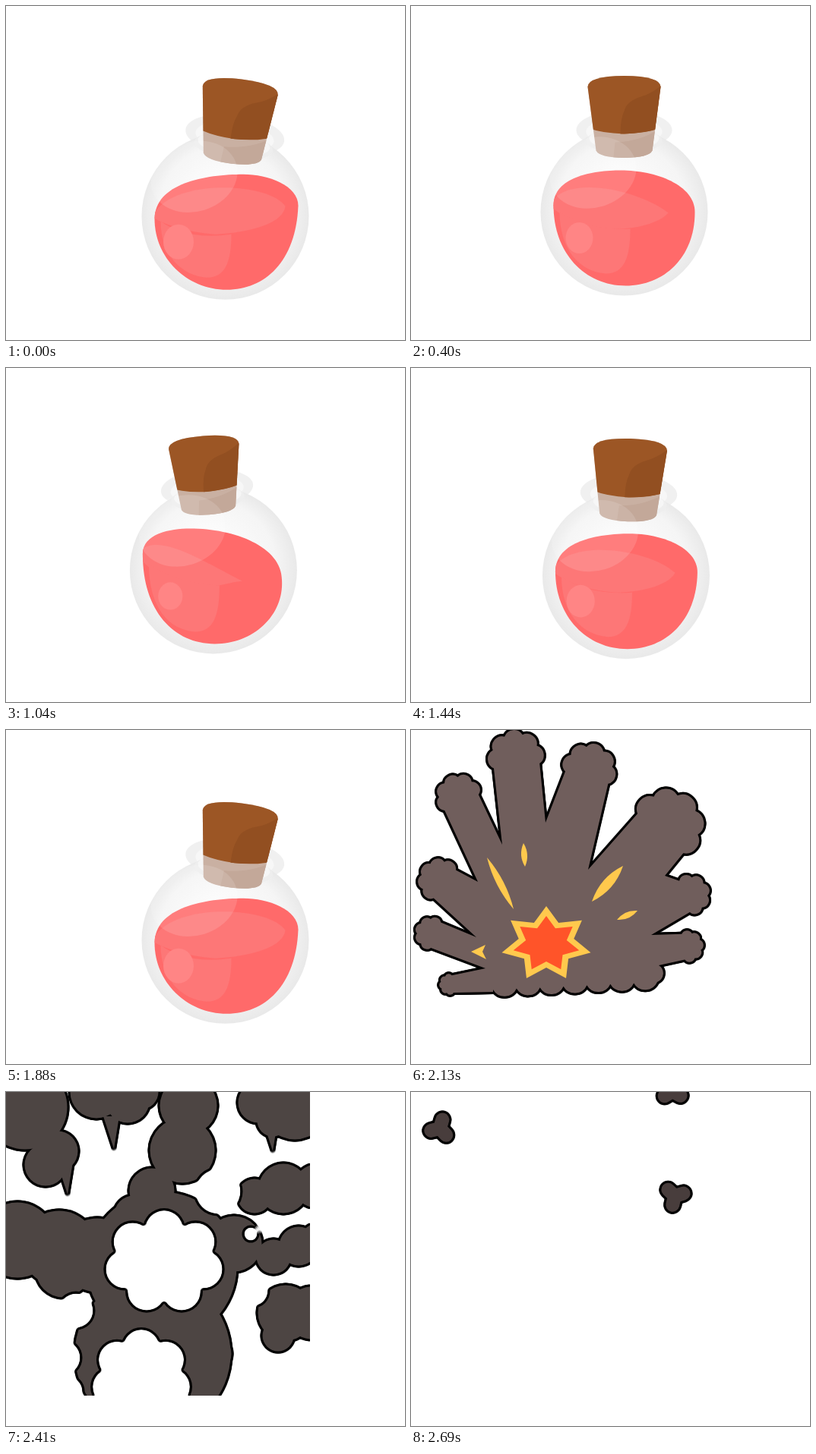
Recreate the animation shown at these times as an HTML page with a canvas. Size 525x440 px, loop 2.76 s.

```html
<!DOCTYPE html>
<html lang="en">
<head>
<meta charset="utf-8">
<title>Potion</title>
<style>
html, body { margin: 0; width: 100%; height: 100%; overflow: hidden; background: #fff; }
canvas { display: block; }
</style>
</head>
<body>
<canvas id="stage" width="525" height="440"></canvas>
<script>
const g = document.getElementById('stage').getContext('2d');
const LOOP = 2760, BLAST = 1920, AREA = 400, TAU = Math.PI * 2;

const clamp = u => Math.max(0, Math.min(1, u));
const ease = u => (1 - Math.cos(Math.PI * clamp(u))) / 2;
const mix = (a, b, u) => a + (b - a) * u;

function fill(shape, color) {
  g.fillStyle = color;
  g.fill(typeof shape === 'string' ? new Path2D(shape) : shape);
}

function oval(x, y, rx, ry, color, turn = 0) {
  g.beginPath();
  g.ellipse(x, y, rx, ry, turn, 0, TAU);
  g.fillStyle = color;
  g.fill();
}

// ---- bottle; s is the sway, from 1 (right) to -1 (left) ----

function cork() {
  g.clip(new Path2D('M-48-40Q-48-54 0-54.5Q48-54 48-40L37 44Q33 53 0 53.5Q-33 53-37 44Z'));
  fill('M-60-60H60V60H-60Z', '#c9b0a2');
  fill('M60 5Q30 32-12 33L-15 60H60Z', '#c3a899');
  fill('M-60-60H60V8Q40 21 0 22Q-40 21-60 8Z', '#9c5625');
  fill('M60-52Q40-32 22-27Q3-21 0-8Q-5 2-5 22Q40 21 60 8Z', '#924f21');
}

// The liquid tips against the bottle: one shoulder rises as the other sinks.
function liquid(s) {
  const w = 93, top = -55, peak = 28 * s - 4;
  const left = 13 * s - 9, right = -13.5 * s;
  const body = new Path2D(`M${-w} ${left}
    C${-w} ${mix(left, top, .8)} ${mix(peak, -w, .43)} ${top} ${peak} ${top}
    C${mix(peak, w, .47)} ${top} ${w + 3 * s} ${mix(right, top, .65)} ${w + 3 * s} ${right}
    C${w} 60 52 97 2 97C-52 97 ${-w} 54 ${-w} ${left}Z`);
  fill(body, '#ff6a6a');

  g.save();
  g.clip(body);
  const rim = 8 * s - 1;
  fill(`M-95 ${left - 5}C-72 -49 ${20 + 36 * s} ${-29 - 17 * s} ${58 + 21 * s} ${1 - 14 * s}
    C${45 + 30 * s} 16 10 23 -14 ${22 + 2 * s}Q-65 19 -95 ${rim - 5}Z`, '#fd7777');
  fill(`M-85 ${rim}Q-50 ${rim + 25} 8 ${22 + 2 * s}C8 60 0 81 -24 81C-58 79 -85 50 -85 ${rim}Z`, '#fd7777');
  oval(-59 - 2.5 * s, 34, 18 + 2 * s, 20.5 + 2.5 * s, '#ff8585');
  g.restore();
}

function bottle(s) {
  const r = 110;
  const hang = paint => {
    g.save();
    g.rotate((5.7 * s + 1.1 * s * s) * Math.PI / 180);
    g.translate(0, -125);
    g.scale(1 + .037 * s, 1 + .037 * s);
    paint();
    g.restore();
  };

  g.save();
  g.translate(280.5 + 8 * s, 271.5 + 5.3 * s);
  hang(() => {
    oval(0, 17, 63, 26, '#f0f0f0');
    oval(0, 19, 50, 19, '#f7f7f7');
  });
  const glass = g.createRadialGradient(-5, -25, 20, 0, 0, r);
  glass.addColorStop(0, '#fcfcfc');
  glass.addColorStop(.7, '#f5f5f5');
  glass.addColorStop(1, '#e9e9e9');
  oval(0, 0, r, r, glass);
  hang(() => {
    oval(0, 31, 50, 17, '#eeeeee');
    oval(0, 28, 46, 15, '#f6f6f6');
    cork();
  });
  liquid(s);
  oval(-41, -52, 58, 46, 'rgba(255,255,255,.13)', -.3);
  g.restore();
}

// ---- smoke: shapes are merged on a layer, then outlined ----

const layer = document.createElement('canvas');
layer.width = layer.height = AREA;
const m = layer.getContext('2d');

function ink(paint, color) {
  m.clearRect(0, 0, AREA, AREA);
  m.save();
  m.fillStyle = '#000';
  paint();
  m.restore();
  for (let a = 0; a < TAU; a += TAU / 16) g.drawImage(layer, 3 * Math.cos(a), 3 * Math.sin(a));
  m.save();
  m.globalCompositeOperation = 'source-in';
  m.fillStyle = color;
  m.fillRect(0, 0, AREA, AREA);
  m.restore();
  g.drawImage(layer, 0, 0);
}

function zoom(ctx, x, y, k) {
  ctx.translate(x, y);
  ctx.scale(k, k);
  ctx.translate(-x, -y);
}

function ball(x, y, rx, ry = rx) {
  m.beginPath();
  m.ellipse(x, y, rx, ry, 0, 0, TAU);
  m.fill();
}

// Arms clockwise: head x, y, radius, then the notch that follows.
const arms = [
  [51, 335, 12, 98, 314], [27, 268, 19, 86, 273], [38, 198, 25, 88, 200],
  [63, 88, 26, 120, 151], [138, 37, 32, 177, 122], [234, 53, 31, 233, 184],
  [337, 126, 42, 334, 192], [367, 217, 23, 316, 270], [364, 285, 18, 326, 310]
];

function plumePath() {
  let x = 108, y = 345, d = `M${x} ${y}`;
  const line = (px, py) => { d += `L${px} ${py}`; x = px; y = py; };
  const puff = (px, py) => {
    const r = Math.hypot(px - x, py - y) * .56;
    d += `A${r} ${r} 0 0 1 ${px} ${py}`;
    x = px; y = py;
  };
  for (const [hx, hy, r, nx, ny] of arms) {
    const aim = Math.atan2(hy - (y + ny) / 2, hx - (x + nx) / 2);
    for (let k = 0; k <= 5; k++) {
      const a = aim + mix(-1.9, 1.9, k / 5);
      (k ? puff : line)(hx + r * Math.cos(a), hy + r * Math.sin(a));
    }
    line(nx, ny);
  }
  for (let k = 0; k <= 7; k++) puff(mix(324, 108, k / 7), mix(332, 342, k / 7));
  return new Path2D(d + 'Z');
}

function starPath(k) {
  const star = new Path2D();
  for (let i = 0; i < 14; i++) {
    const a = i * TAU / 14 - TAU / 4, r = k * (i % 2 ? .62 : 1);
    star.lineTo(178 + 60 * r * Math.cos(a), 282 + 50 * r * Math.sin(a));
  }
  star.closePath();
  return star;
}

function spark(x1, y1, x2, y2, w) {
  const len = Math.hypot(x2 - x1, y2 - y1);
  const cx = (x1 + x2) / 2, cy = (y1 + y2) / 2;
  const dx = (y2 - y1) / len * w, dy = (x1 - x2) / len * w;
  fill(`M${x1} ${y1}Q${cx + dx} ${cy + dy} ${x2} ${y2}Q${cx - dx} ${cy - dy} ${x1} ${y1}Z`, '#ffc94d');
}

const plume = plumePath(), star = starPath(1), core = starPath(.74);

function burst(k, color, lit) {
  ink(() => {
    zoom(m, 178, 292, k);
    m.fill(plume);
  }, color);
  if (!lit) return;
  g.save();
  zoom(g, 178, 292, k);
  spark(100, 168, 135, 236, 9);
  spark(148, 149, 150, 180, 8);
  spark(279, 179, 238, 226, 13);
  spark(298, 238, 271, 250, 8);
  fill('M79 292L98 283 94 292 99 302Z', '#ffc94d');
  fill(star, '#ffc94d');
  fill(core, '#ff5429');
  g.restore();
}

// Main masses and gaps as x, y, radius.
const puffs = [
  [240, 18, 39], [232, 77, 44], [192, 130, 31], [168, 162, 27],
  [15, 195, 51], [70, 206, 51], [75, 235, 37], [120, 215, 50],
  [205, 230, 100], [193, 345, 104], [270, 345, 28], [300, 200, 38],
  [327, 137, 24], [365, 127, 34], [408, 124, 30],
  [352, 217, 24], [385, 203, 27], [412, 198, 27],
  [368, 291, 38], [402, 291, 36], [358, 321, 22],
  [25, 20, 57], [68, 78, 28], [52, 96, 29],
  [119, 0, 36], [160, 12, 30], [178, 0, 24],
  [332, 14, 28], [380, 18, 46], [351, 38, 22]
];
const gaps = [
  [279, 131, 31], [322, 187, 10], [325, 262, 21],
  [92, 288, 24], [75, 350, 24], [82, 394, 20]
];
const tips = [[81, 137], [142, 77], [351, 80]];

function flower(x, y, rx, ry, lobe) {
  ball(x, y, rx * 1.12, ry * 1.12);
  for (let a = 0; a < 7; a++) {
    const turn = a * TAU / 7 - TAU / 4;
    ball(x + rx * Math.cos(turn), y + ry * Math.sin(turn), lobe);
  }
}

// u is 0 when the cloud fills the area; it thins out as u grows.
function breakUp(u, color) {
  const spread = 1 + .14 * u, size = 1 - .15 * u, open = 1 + .25 * u;
  const out = v => 205 + (v - 205) * spread;
  ink(() => {
    for (const [x, y, r] of puffs) ball(out(x), out(y), r * size - 1.5);
    for (const [x, y] of tips) {
      m.beginPath();
      m.moveTo(out(x), out(y - 45) + 43 * size);
      m.lineTo(out(x) - 14 * size, out(y - 45));
      m.lineTo(out(x) + 7 * size, out(y - 45));
      m.fill();
    }
    m.globalCompositeOperation = 'destination-out';
    for (const [x, y, r] of gaps) ball(out(x), out(y), r * open + 1.5);
    flower(208, 224, 53 * open, 43 * open, 28 * open);
    flower(178, 379, 41 * open, 42 * open, 27 * open);
  }, color);
}

// Three lobes around a point.
function wisp(x, y, turn) {
  m.lineCap = m.lineJoin = 'round';
  m.lineWidth = 18;
  m.beginPath();
  for (let k = 0; k < 3; k++) {
    const a = turn + k * TAU / 3;
    m.moveTo(x, y);
    m.lineTo(x + 12 * Math.cos(a), y + 12 * Math.sin(a));
  }
  m.stroke();
}

function blast(step) {
  const fade = clamp((step - 3) / 4);
  const color = `rgb(${mix(112, 77, fade)},${mix(94, 69, fade)},${mix(92, 67, fade)})`;
  g.save();
  g.beginPath();
  g.rect(0, 0, AREA, AREA);
  g.clip();
  if (step < 6) burst(step < 3 ? 1 - .08 * (3 - step) ** 2 : 1 + .15 * (step - 3), color, step < 5);
  else if (step < 11) breakUp(step - 7, color);
  else ink(() => {
    wisp(38, 48, 2.9);
    wisp(347, 137, 3.9);
    wisp(344, -1, .5);
  }, '#483d3c');
  g.restore();
}

function draw(now) {
  const t = now % LOOP;
  g.fillStyle = '#fff';
  g.fillRect(0, 0, 525, 440);
  if (t < BLAST) {
    const held = Math.floor(t / 40) * 40;
    bottle(1 - 2 * (ease(held / 800) - ease((held - 960) / 800)));
  } else {
    blast(Math.floor((t - BLAST) / 70));
  }
}

const start = performance.now();
function tick() {
  draw(performance.now() - start);
  requestAnimationFrame(tick);
}
tick();
</script>
</body>
</html>
```
